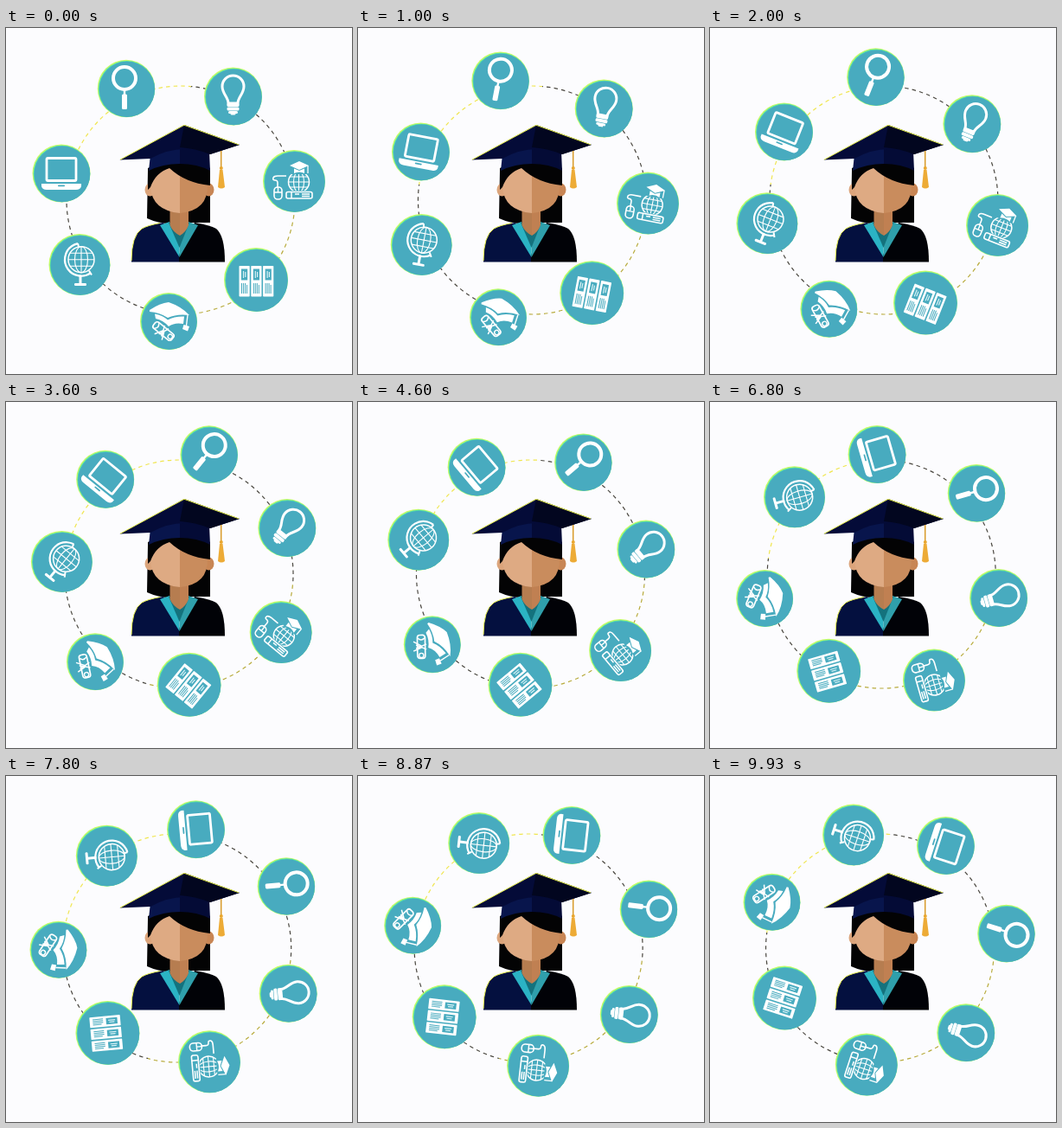
An HTML page with a canvas for the animation above (10000 ms loop, 400 by 400 pixels).

```html
<!DOCTYPE html>
<html lang="en">
<head>
<meta charset="utf-8">
<style>
html, body { margin: 0; width: 100%; height: 100%; overflow: hidden; background: #fcfcfe; }
canvas { display: block; width: 400px; height: 400px; }
</style>
</head>
<body>
<canvas id="stage" width="400" height="400"></canvas>
<script>
const c = document.getElementById('stage').getContext('2d');
const LOOP = 10000, STEP = 1000 / 15, SPEED = 10.87 * Math.PI / 180;
const TEAL = '#48abbf', WHITE = '#fff', GLOW = '#e6ee4c';

function fill(color, d) {
  c.fillStyle = color;
  c.fill(new Path2D(d));
}
function stroke(width, d, color = WHITE) {
  c.lineWidth = width;
  c.strokeStyle = color;
  c.stroke(new Path2D(d));
}
function box(color, x, y, w, h, r = 0) {
  c.fillStyle = color;
  c.beginPath();
  c.roundRect(x, y, w, h, r);
  c.fill();
}
function frame(width, x, y, w, h, r) {
  c.lineWidth = width;
  c.strokeStyle = WHITE;
  c.beginPath();
  c.roundRect(x, y, w, h, r);
  c.stroke();
}
function oval(x, y, rx, ry = rx) {
  c.beginPath();
  c.ellipse(x, y, rx, ry, 0, 0, Math.PI * 2);
}
function ring(width, x, y, rx, ry) {
  oval(x, y, rx, ry);
  c.lineWidth = width;
  c.strokeStyle = WHITE;
  c.stroke();
}
function disc(color, x, y, rx, ry) {
  oval(x, y, rx, ry);
  c.fillStyle = color;
  c.fill();
}
function wireGlobe(x, y, r) {
  ring(1.5, x, y, r);
  ring(1.1, x, y, r * .5, r);
  c.beginPath();
  c.moveTo(x, y - r);
  c.lineTo(x, y + r);
  for (const k of [-.5, 0, .5]) {
    const half = r * Math.sqrt(1 - k * k);
    c.moveTo(x - half, y + k * r);
    c.lineTo(x + half, y + k * r);
  }
  c.lineWidth = 1.1;
  c.stroke();
}

// Icons are drawn around the centre of their own disc.
function magnifier() {
  ring(4, -2, -12, 13);
  box(WHITE, -3.2, 2, 2.4, 6);
  box(WHITE, -5, 6.5, 6, 17.5, 1.5);
}

function bulb() {
  stroke(3, 'M-5.5 8C-5.5 1-12.5-3-12.5-11.5A12.5 12.5 0 0 1 12.5-11.5C12.5-3 5.5 1 5.5 8Z');
  box(WHITE, -7, 8, 14, 4, 1.5);
  box(WHITE, -7, 12.5, 14, 4, 1.5);
  box(WHITE, -5.5, 17, 11, 3, 1.5);
  box(WHITE, -3, 18.5, 6, 3, 1.5);
}

function eLearning() {
  wireGlobe(5.5, 1, 12);
  fill(TEAL, 'M-6-18L6-24L18-18V-8H-3Z');
  fill(WHITE, 'M-5-18L6-23L17-18L6-13Z M0-14.5L6-12L12-14.5V-9Q6-12 0-9Z');
  stroke(1.3, 'M16-18V-9');
  stroke(1.6, 'M-19 8V2Q-19-1-22-1Q-25-1-24-4Q-23-6-19-6H-9');
  frame(1.6, -23, 7, 9, 14, 4);
  stroke(1.4, 'M-18.5 7V13M-23 13H-14');
  box(TEAL, -10, 11, 33, 11);
  frame(1.6, -9, 12.5, 30, 7.5, 2);
  stroke(1.5, 'M-3 12.5V20M9 15H18M9 17.5H18M1 15H6');
}

function binders() {
  for (const x of [-19.5, -5.7, 8.1]) {
    box(WHITE, x, -16, 12.2, 35.5, .7);
    box(TEAL, x + 2.5, -12.5, 7.2, 13);
    stroke(1.2, `M${x + 5} -10V-2M${x + 7.3} -9V-3`, '#d7f1f5');
    stroke(1, `M${x + 3} 4V16M${x + 5} 4V16M${x + 7} 4V16M${x + 9} 6V16`, TEAL);
  }
}

function graduation() {
  fill(WHITE, 'M-22-13Q-10-21 0-22Q15-17 24-7Q10-9-1-4Q-10-10-22-11Z');
  fill(WHITE, 'M-16-8.5Q-7-7-1-1.5Q7-6 18-5.5L17 3Q7 1 0 6Q-6-1-15-3Z');
  stroke(1.4, 'M22-7L20.5 5');
  fill(WHITE, 'M17.5 4L24 6L22 11.5L16 9Z');
  c.save();
  c.translate(-6, 11.5);
  c.rotate(.68);
  frame(1.7, -13.5, -4.5, 27, 9, 3);
  stroke(1.5, 'M-10-4Q-6 0-10 4M-3-6L2 6M3-6L-2 6M-1 0L-6 9M1 0L5 9');
  ring(1.4, 10, 0, 2.6);
  c.restore();
}

function deskGlobe() {
  wireGlobe(2, -5.8, 15);
  c.lineWidth = 2.2;
  c.beginPath();
  c.arc(2, -5.8, 19, .95, 4.5);
  c.stroke();
  stroke(2, 'M-2-24.5L-1-20.5M11 7L14 12');
  box(WHITE, -.5, 12, 3, 10);
  box(WHITE, -6, 21.5, 14, 3, 1.2);
}

function laptop() {
  frame(2.8, -17, -17.5, 34, 26, 1.5);
  fill(WHITE, 'M-23 12H23V15Q22 19 17 19H-17Q-22 19-23 15Z');
  box(TEAL, -4, 13.5, 8, 1.7, .8);
}

const BADGES = [
  [-61, -130, 33.3, magnifier],
  [62.5, -121, 33.5, bulb],
  [133, -23, 36, eLearning],
  [89, 91, 37, binders],
  [-12, 139, 33, graduation],
  [-115, 73.5, 35.5, deskGlobe],
  [-136, -32, 33.5, laptop]
];

function dashedRing(angle, progress) {
  const x = 202 - 5.5 * progress, y = 199, r = 132;
  const pitch = 2 * Math.PI * r / 96;
  const tint = c.createConicGradient(0, x, y);
  const dark = '#4a4740';
  const bands = [[5, dark], [105, '#b8ab3c'], [188, dark], [275, '#f0e650'], [360, dark]];
  let from = 0;
  for (const [to, color] of bands) {
    tint.addColorStop(from / 360, color);
    tint.addColorStop(to / 360, color);
    from = to;
  }
  c.save();
  c.setLineDash([pitch * .52, pitch * .48]);
  c.lineDashOffset = -r * angle;
  c.lineWidth = 1.2;
  c.strokeStyle = tint;
  oval(x, y, r);
  c.stroke();
  c.restore();
}

function badge([dx, dy, r, icon], angle) {
  const cos = Math.cos(angle), sin = Math.sin(angle);
  c.save();
  c.translate(200 + dx * cos - dy * sin, 200 + dx * sin + dy * cos);
  // bright rim on the upper left
  disc('#c4fb66', 0, 0, r);
  disc('#4fdcae', .5, .5, r - .7);
  disc(TEAL, .9, .9, r - 1.2);
  c.rotate(angle);
  icon();
  c.restore();
}

function graduate() {
  // hair
  fill('#030304', 'M164 165Q200 135 236 165V225H211V210H190V226Q176 226 163 220Z');
  // gown
  fill('#04103f', 'M145 270.5Q145 240 157 232Q164 228 182 225L200 262V270.5Z');
  fill('#010207', 'M253 270.5Q253 240 243 232Q236 228 218 225L200 262V270.5Z');
  stroke(1, 'M145 269Q145 240 157 232Q164 228 178 225.5', GLOW);
  // collar and neck
  fill('#2bb3c4', 'M178 228L189 224L200.5 251V265Z');
  fill('#2f9fab', 'M222 228L211 224L200.5 251V265Z');
  fill('#14727d', 'M188 225H212L200.5 254Z');
  fill('#b67d50', 'M189.5 207H201V240Q193 236 189.5 228Z');
  fill('#c08052', 'M201 207H211V228Q208 236 201 240Z');
  // ears and face
  disc('#dba47b', 166.5, 187, 6, 7.5);
  disc('#c88655', 234.5, 187, 6, 7.5);
  fill('#deaa83', 'M167 180Q174 161 201 158V214Q169 211 167 184Z');
  fill('#c98c5d', 'M201 160Q226 166 233 181Q234 211 201 214Z');
  // fringe of hair
  fill('#030304', 'M164 187V162Q200 146 236 162V182Q207 179 189 162Q173 167 167 184Z');
  // mortarboard
  fill('#08154c', 'M167 146Q200 128 201 129V157Q181 157 165 165Z');
  fill('#040b36', 'M201 129L235 142L236 165Q221 157 201 157Z');
  fill('#040b38', 'M131.5 152.5L206 112L270 135L236 146Q201 132 167 151Z');
  fill('#02061f', 'M206 112L270 135L236 146Q218 139 201 138Z');
  stroke(1, 'M132 152.2L206 112.3L269 134.8', GLOW);
  // tassel
  stroke(1.5, 'M248.7 142V163', '#d89a28');
  disc('#e9a62d', 248.8, 162, 2);
  fill('#edab36', 'M247 164H250.5L253 184Q249 187 245 184Z');
}

function draw(time) {
  const t = Math.floor((time % LOOP + 4) / STEP) * STEP;
  const angle = SPEED * t / 1000;
  c.fillStyle = '#fcfcfe';
  c.fillRect(0, 0, 400, 400);
  dashedRing(angle, t / LOOP);
  for (const item of BADGES) badge(item, angle);
  graduate();
}

let start;
function tick(now) {
  start ??= now;
  draw(now - start);
  requestAnimationFrame(tick);
}
draw(0);
requestAnimationFrame(tick);
</script>
</body>
</html>
```
